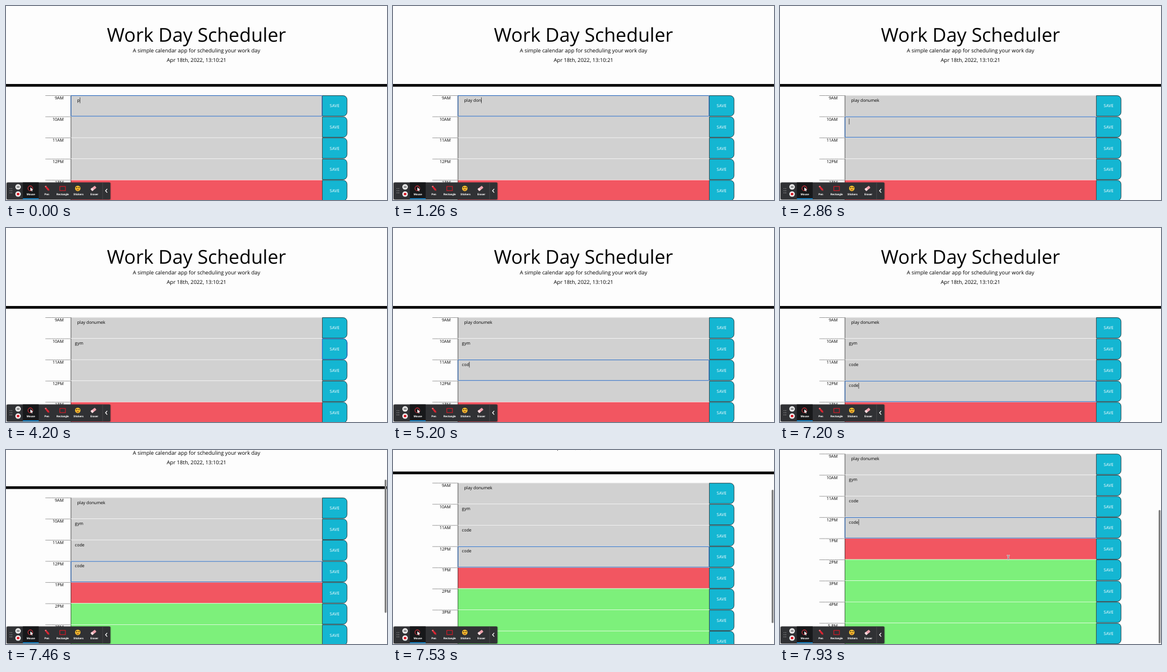
Recreate the animation shown at these times as an HTML page. Size 640x326 px, loop 8 s.

```html
<!DOCTYPE html>
<html lang="en">
<head>
<meta charset="utf-8">
<title>Work Day Scheduler</title>
<style>
  html, body { margin: 0; width: 100%; height: 100%; overflow: hidden; background: #fdfdfd; }
  svg { display: block; width: 640px; height: 326px; }
  text { white-space: pre; text-rendering: geometricPrecision; }
  .page text { font-family: "Open Sans", sans-serif; font-size: 7.11px; }
  .page .title { font-size: 32px; }
  .page .lead { font-size: 8.89px; }
  .mid { text-anchor: middle; }
  .end { text-anchor: end; }
  .bar text { font: bold 4.6px Roboto, sans-serif; fill: #fff; text-anchor: middle; }
</style>
</head>
<body>
<svg viewBox="0 0 640 326">
  <g class="page" id="page">
    <text class="title mid" x="320" y="59.7">Work Day Scheduler</text>
    <text class="lead mid" x="320" y="78.1">A simple calendar app for scheduling your work day</text>
    <text class="lead mid" x="320" y="94.2">Apr 18th, 2022, 13:10:21</text>
    <rect y="131.1" width="640" height="4.5"/>
    <g id="rows"></g>
    <rect id="ring" x="109.2" width="421.7" height="34.6" rx=".6" fill="none" stroke="#2a6bc2" stroke-width="1"/>
    <rect id="caret" width=".6" height="9.8"/>
  </g>

  <rect id="thumb" x="636" width="3.2" height="224" rx="1.6" fill="#808080"/>

  <g id="beam" fill="none" stroke-linecap="round">
    <path id="ibeam" d="M381.6 177.2q1.9 0 1.9 1.2q0-1.2 1.9-1.2M383.5 178.4v4.4M381.6 184q1.9 0 1.9-1.2q0 1.2 1.9 1.2" stroke="#fff" stroke-width="1.5"/>
    <use href="#ibeam"/>
    <path d="M381.6 177.2q1.9 0 1.9 1.2q0-1.2 1.9-1.2M383.5 178.4v4.4M381.6 184q1.9 0 1.9-1.2q0 1.2 1.9 1.2" stroke="#333" stroke-width=".6"/>
  </g>

  <g class="bar">
    <rect x="0" y="296" width="176.5" height="31" rx="2.5" opacity=".18"/>
    <rect x="1" y="296.4" width="174.4" height="28.8" rx="2" fill="#303134"/>
    <rect x="28.3" y="296.4" width="26.6" height="28.8" fill="#17181a"/>
    <rect x="28.3" y="323.2" width="26.6" height="1.6" fill="#1c9bea"/>
    <path d="M6.9 306.8h0M9.7 306.8h0M6.9 310.4h0M9.7 310.4h0M6.9 314h0M9.7 314h0" stroke="#b5b5b5" stroke-width="1.3" stroke-linecap="round"/>
    <circle cx="20.3" cy="304" r="4.6" fill="#f4f4f4"/>
    <path d="M19 302v4M21.6 302v4" stroke="#303134" stroke-width="1.1"/>
    <circle cx="20.3" cy="316" r="4.6" fill="#f4f4f4"/>
    <rect x="18.2" y="313.9" width="4.2" height="4.2" rx=".5" fill="#d8202c"/>

    <circle cx="40.9" cy="306.4" r="4" fill="none" stroke="#d5303c" stroke-width="1.1"/>
    <path d="M41 304.8v6l1.5-1.3 1 2.1 1.1-.5-1-2 2-.2z" fill="#fff"/>
    <path d="M65 303.2l2-1.2 5.3 5.4.5 3.2-3-.8z" fill="#d92632"/>
    <path d="M65 303.2l2-1.2 1.3 1.3-2 1.3z" fill="#f07a80"/>
    <rect x="90.4" y="303.2" width="9.4" height="7" fill="none" stroke="#c81c28" stroke-width="1.2"/>
    <circle cx="120.6" cy="306.6" r="4.6" fill="#f5bd2f"/>
    <path d="M117.8 305.2h2M121.6 305.2h2" stroke="#3c2a12" stroke-width="1.4"/>
    <path d="M118.2 308.2q2.4 2.4 4.8 0z" fill="#8a2e1c"/>
    <g transform="rotate(-38 147 306.5)">
      <rect x="142.4" y="304.2" width="9.2" height="4.6" rx="1" fill="#f0a3ae"/>
      <rect x="142.4" y="304.2" width="3.4" height="4.6" rx="1" fill="#f6dfe2"/>
    </g>
    <text x="41.8" y="317.9">Mouse</text>
    <text x="68.5" y="317.9">Pen</text>
    <text x="95.2" y="317.9">Rectangle</text>
    <text x="121.8" y="317.9">Stickers</text>
    <text x="148.4" y="317.9">Eraser</text>
    <path d="M162.2 296.4v28.8" stroke="#56575a" stroke-width=".6"/>
    <path d="M170 307.3l-2.8 3.2 2.8 3.2" fill="none" stroke="#fff" stroke-width="1.2"/>
  </g>
</svg>
<script>
const LOOP = 8000, TICK = 1000 / 15, VIEW = 326;
const TOP = 149.8, ROW = 320 / 9, HEIGHT = TOP + 9 * ROW, MAX_SCROLL = HEIGHT - VIEW;
const TEXT_X = 115.8;
const hours = ["9AM", "10AM", "11AM", "12PM", "1PM", "2PM", "3PM", "4PM", "5 PM"];

// One entry per filled row: when it gains focus, each key press, when SAVE takes the focus
const entries = [
  { text: "play donumek", pad: "  ", focus: 0, save: 2330,
    keys: [0, 200, 330, 460, 660, 860, 1060, 1260, 1330, 1400, 1460, 1600] },
  { text: "gym", pad: "", focus: 2860, save: 4000, keys: [3330, 3530, 3800] },
  { text: "code", pad: "", focus: 4660, save: 5600, keys: [4930, 5060, 5200, 5400] },
  { text: "code", pad: "", focus: 6200, save: LOOP, keys: [6460, 6660, 6800, 6900] }
];

const $ = id => document.getElementById(id);
const rowTop = i => TOP + i * ROW;

function add(parent, tag, attrs, text = "") {
  const el = document.createElementNS("http://www.w3.org/2000/svg", tag);
  for (const key in attrs) el.setAttribute(key, attrs[key]);
  el.textContent = text;
  return parent.appendChild(el);
}

const rows = hours.map((hour, i) => {
  const g = add($("rows"), "g", { transform: `translate(0 ${rowTop(i)})` });
  const fill = i < 4 ? "#d1d1d1" : i === 4 ? "#f25661" : "#7df07b";
  add(g, "path", { d: "M66.7 .7H108.9", stroke: "#000", "stroke-width": .6, "stroke-dasharray": "1.4 .9" });
  add(g, "text", { class: "end", x: 97, y: 7.2 }, hour);
  add(g, "rect", { x: 108.9, y: 0, width: 422.2, height: ROW + .1, fill });
  add(g, "rect", { x: 108.9, y: 0, width: 422.2, height: .65, fill: "#fff" });
  add(g, "path", { d: `M109.1 .5V${ROW}`, stroke: "#000", "stroke-width": .6 });
  const shape = "M531.4 .8H566.3a6.6 6.6 0 0 1 6.6 6.6V28.6a6.6 6.6 0 0 1 -6.6 6.6H531.4z";
  add(g, "path", { d: shape, fill: "#14b6d2", stroke: "#1c2a2e", "stroke-width": .8 });
  const glow = add(g, "path", { d: shape, fill: "none", stroke: "#1f6fd0", "stroke-width": 1, opacity: 0 });
  add(g, "text", { class: "mid", x: 552, y: 20.6, fill: "#fff" }, "SAVE");
  return { glow, note: add(g, "text", { x: TEXT_X, y: 10.9 }) };
});

function scrollAt(t) {
  const tick = Math.floor((t + 7) / TICK);
  const p = Math.min(1, Math.max(0, (tick - 110) / 9));
  return MAX_SCROLL * (1 - (1 - p) ** 2.66);
}

function show(el, on) { el.style.display = on ? "" : "none"; }

function render(t) {
  let active = -1, last = 0;
  entries.forEach((e, i) => {
    const typed = e.keys.filter(k => k <= t);
    const { note, glow } = rows[i];
    const value = typed.length ? e.pad + e.text.slice(0, typed.length) : "";
    if (note.textContent !== value) note.textContent = value;
    const next = entries[i + 1];
    const saving = t >= e.save && next && t < next.focus;
    glow.setAttribute("opacity", saving ? Math.min(1, (t - e.save + 60) / 150) : 0);
    if (t >= e.focus && t < e.save) {
      active = i;
      last = Math.max(e.focus, ...typed);
    }
  });

  show($("ring"), active >= 0);
  show($("caret"), active >= 0 && (t - last) % 1000 < 500);
  if (active >= 0) {
    $("ring").setAttribute("y", rowTop(active) + .75);
    const note = rows[active].note;
    const width = note.textContent ? note.getComputedTextLength() : 0;
    $("caret").setAttribute("x", TEXT_X + width);
    $("caret").setAttribute("y", rowTop(active) + 3.8);
  }

  const y = scrollAt(t);
  $("page").setAttribute("transform", `translate(0 ${-y})`);
  $("thumb").setAttribute("y", 1 + y * VIEW / HEIGHT);
  show($("thumb"), y > 0);
  show($("beam"), t >= 7600);
}

const start = performance.now();
function frame() {
  render((performance.now() - start) % LOOP);
  requestAnimationFrame(frame);
}
frame();
</script>
</body>
</html>
```
